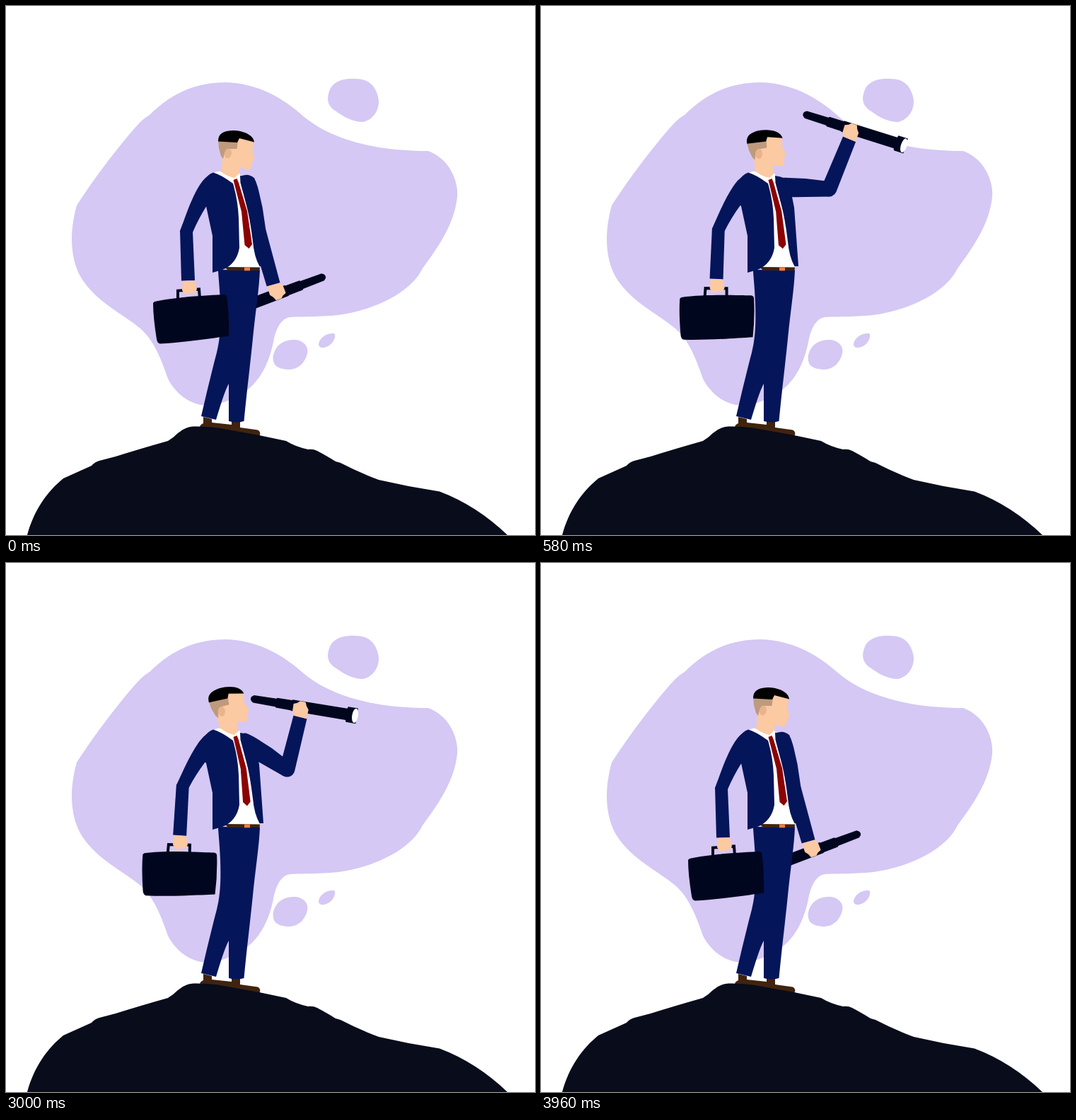
These frames come from a looping animation (748 by 748 pixels, 5.08 s). An HTML page:

```html
<!DOCTYPE html>
<html lang="en">
<head>
<meta charset="utf-8">
<title>Looking ahead</title>
<style>
  html, body { margin: 0; width: 100%; height: 100%; overflow: hidden; background: #fff; }
  svg { display: block; width: 100vw; height: 100vh; }
  .suit { fill: #05155a; }
  .dark { fill: #01061f; }
  .skin { fill: #fbc9a2; }
  .brown { fill: #40230f; }
  .white { fill: #fff; }
  .blob { fill: #d5c8f4; }
</style>
</head>
<body>
<svg viewBox="0 0 748 748">
  <g class="blob">
    <path d="M203 154C235 122 270 108 310 108C350 109 385 125 416 152C460 192 530 205 597 205C625 215 640 245 638 270C634 310 608 345 589 371C570 410 510 432 470 437C440 440 415 439 402 440C392 441 384 450 379 470C372 510 355 535 335 547C315 560 295 566 275 564C255 560 238 545 229 527C222 508 212 475 190 456C165 435 130 420 108 387C92 362 88 325 100 282C120 250 165 190 190 164Q196 158 203 154Z"/>
    <path d="M457 121C462 105 480 102 495 103C512 103 522 112 526 128C530 142 522 160 505 164C490 164 478 157 467 149C455 142 453 132 457 121Z"/>
    <path d="M379 490C384 476 397 471 410 472C422 474 428 482 426 491C423 505 413 513 402 514C392 514 382 512 379 505C377 500 377 495 379 490Z"/>
    <path d="M442 478C443 470 452 462 464 463C467 466 464 475 457 480C451 484 442 485 442 478Z"/>
  </g>

  <!-- arm with telescope, drawn pointing right from the shoulder -->
  <g id="upper">
    <path class="suit" d="M-18 7Q-21 -6 -11 -12.5Q-4 -14.3 8 -14.3L32 -13.8L66 -10.5V11L18 12.7L-5 13Z"/>
    <g id="fore">
      <path class="suit" d="M0 -10.8L76 -10V9.5L0 11A10.9 10.9 0 0 1 0 -10.8Z"/>
      <g transform="translate(90.5 -1.8) rotate(85)">
        <path class="dark" d="M-72 -3Q-74 0 -72 3L-69 5.3L-37 5.8L-36 7L-15 7.2L-14 8L64 8.2L65 11H79V-11H65L64 -8.2L-14 -8L-15 -7.2L-36 -7L-37 -5.8L-69 -5.3Z"/>
        <ellipse class="white" cx="76.5" rx="4.3" ry="10.3"/>
      </g>
      <path class="skin" d="M76 -9.5L82 -13L92 -14L94.5 -9L98 -6L98.5 2L93.5 4.5L89 8.5L76 9Z"/>
    </g>
  </g>

  <g id="head">
    <path class="skin" d="M303 198L329 185L350 190L348.5 206L352 217L348 220L347 229L343 231.5L331 228L328 246L316 248L304 238L306 214Z"/>
    <path fill="#bf9a7c" d="M300 190L328 190L326.5 202L315 202L309 208L307 216L304 212L301 201Z"/>
    <ellipse cx="314" cy="208.5" rx="5" ry="7" fill="#e8b48e" transform="rotate(12 314 208)"/>
    <path d="M300 191.5C300 181 306 177 320 176C335 176 350 182 351 192.5L330 187L327 193Z"/>
  </g>

  <!-- legs and torso -->
  <path class="brown" d="M279 581L291 584V589L319 592V586L331 587V596L356 599.5Q361 602 358.5 608L274 596Q274 592 279 590Z"/>
  <path class="suit" d="M300 373L359 373.5C358 400 353 430 349 470C345 510 341 540 336.500 587Q326 590 315 587V534C309 545 303 565 297 585L276 580C283 550 290 520 298 490C303 470 304 450 303 420C302 395 300 380 300 373Z"/>
  <path class="white" d="M294 236Q301 232 305 235Q313 241 323 243L330 236.500L336 250L359 370H308L320 340V260Z"/>
  <path class="brown" d="M309 369L359 369.500L358.500 374L314 374Z"/>
  <path d="M337 369.500H345V374.300H337Z" fill="#f57c3c"/>
  <path id="tie" fill="#8b0304" d="M321.500 246L326.500 244L329 250L341 290L348 337L343.500 343L337.500 338L333 291Z"/>
  <path class="suit" d="M331 240Q339 241 345 244L355 270L358 285L364 368L358.500 368Q351 355 349 333Q345 300 339.500 280L331.500 250Z"/>
  <path class="suit" d="M278 249Q285 238 293 235.500Q303 238 321 251Q328 275 329 300L330 342Q326 365 306 373L292 377V325L283 283L270 272Z"/>

  <!-- arm with briefcase -->
  <g id="left">
    <path class="suit" d="M292 238Q282 240 274 253C262 272 254 297 246 318Q255 324 264 320Q272 301 284 282Z"/>
    <g id="case">
      <path class="suit" d="M246 317L264 319L267 388L248 388.500Z"/>
      <path d="M243 415V402.500L273 400.500L274 414" fill="none" stroke="#01061f" stroke-width="4"/>
      <path class="dark" d="M210 418C240 411 290 409 308 408Q312 408 312.500 412Q316 440 315 466.500C290 470 250 476 218 477.500Q214 477 213 471Q208 440 208 420Z"/>
      <path class="skin" d="M249.500 389L267 388.500L270 400L268 405.500L253 408L249 402Z"/>
    </g>
  </g>

  <path fill="#080c1b" d="M30 748C40 712 58 687 81 668L121 650Q125 645 132 643L155 637Q190 626 229 615Q236 611 243 604Q253 595 265 594.500Q280 594 300 596.500L358 607L396 615Q409 623 427 627Q434 626 440 629Q455 637 466 644L473 646Q500 660 527 670Q570 680 613 686.500Q665 706 709 748Z"/>
</svg>
<script>
const LOOP = 5080, FPS = 24;
const start = performance.now();

// angles at rest and raised, then the frames between which each part goes up and comes down
const parts = {
  upper: { rest: 76,   raised: 1.4,    up: [0, 11.2], down: [65, 81] },
  fore:  { rest: 74.4, raised: -108.7, up: [0, 20.2], down: [65.5, 89.5] },
  head:  { rest: 0,    raised: -18,    up: [4.5, 22], down: [65.3, 94.5] },
  tie:   { rest: 0,    raised: 1.7,    up: [4.5, 22], down: [65.3, 94.5] },
  left:  { rest: 0,    raised: 6.1,    up: [4, 21.5], down: [65, 87] },
  case:  { rest: 0,    raised: 1,      up: [4, 21.5], down: [65, 87] }
};

function ease(frame, [from, to]) {
  const x = Math.min(1, Math.max(0, (frame - from) / (to - from)));
  return x * x * (3 - 2 * x);
}

function angle(name, frame) {
  const p = parts[name];
  return p.rest + (p.raised - p.rest) * (ease(frame, p.up) - ease(frame, p.down));
}

function put(id, transform) {
  document.getElementById(id).setAttribute('transform', transform);
}

function draw() {
  const time = (performance.now() - start) % LOOP;
  const frame = Math.floor(time * FPS / 1000 + 0.2);
  const a = name => angle(name, frame);
  put('upper', `translate(341.5 257) rotate(${a('upper')})`);
  put('fore', `translate(65.8 0) rotate(${a('fore') - a('upper')})`);
  put('head', `rotate(${a('head')} 314.5 242)`);
  put('tie', `rotate(${a('tie')} 325 245)`);
  put('left', `rotate(${a('left')} 290 252)`);
  put('case', `rotate(${a('case')} 255.5 319)`);
  requestAnimationFrame(draw);
}
draw();
</script>
</body>
</html>
```
